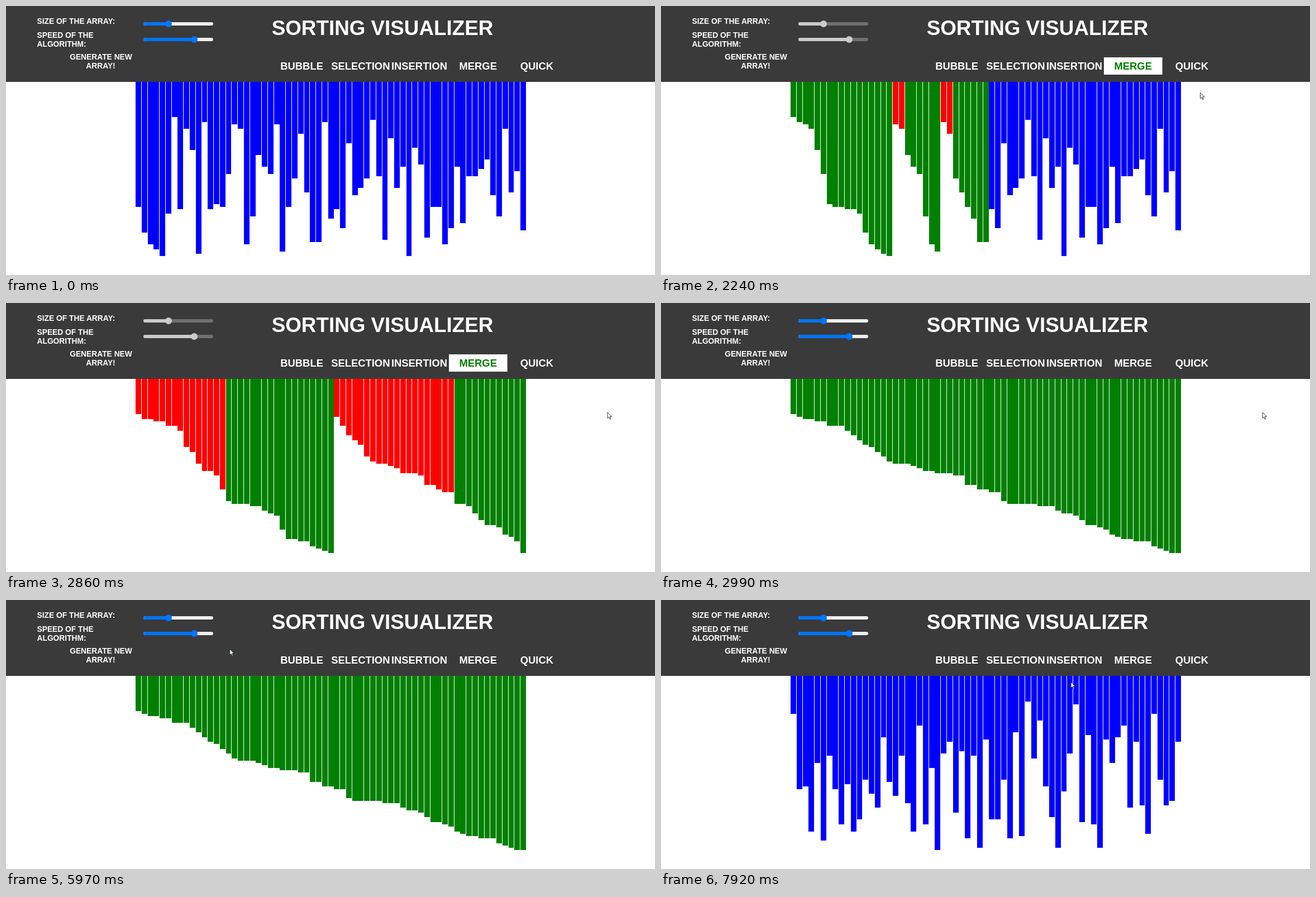
Recreate the animation shown at these times as an HTML page. Size 1162 by 482 pixels, loop 7.99 s.

```html
<!DOCTYPE html>
<html lang="en">
<head>
<meta charset="utf-8">
<title>Sorting visualizer</title>
<style>
  html, body { margin: 0; width: 100%; height: 100%; overflow: hidden; background: #fff; }
  svg { display: block; width: 1162px; height: 482px; }
  text { font: bold 13.8px "Liberation Sans", Arial, sans-serif; fill: #fff; }
  .mid { text-anchor: middle; }
  .title { font-size: 36.8px; }
  .nav text { font-size: 18.4px; }
  .nav rect { fill: none; }
  .nav .lit rect { fill: #fff; }
  .nav .lit text { fill: green; }
  .track { fill: #efefef; }
  .level { fill: #0075ff; }
  .busy .track { fill: #707070; }
  .busy .level { fill: #cbcbcb; }
  #cursor path { fill: #fff; stroke: #12301a; stroke-width: .9; stroke-linejoin: round; }
</style>
</head>
<body>
<svg id="stage" viewBox="0 0 1162 482">
  <rect width="1162" height="136" fill="#3a3a3a"/>
  <text x="55.5" y="31.5">SIZE OF THE ARRAY:</text>
  <text x="55.5" y="56.5">SPEED OF THE</text>
  <text x="55.5" y="72.5">ALGORITHM:</text>
  <text class="mid" x="170" y="96">GENERATE NEW</text>
  <text class="mid" x="169.5" y="112">ARRAY!</text>
  <text class="mid title" x="674" y="52">SORTING VISUALIZER</text>
  <g id="sliders"></g>
  <g id="nav" class="nav"></g>
  <g id="bars" shape-rendering="crispEdges"></g>
  <g id="cursor">
    <path id="arrow" d="M0 0V10.5L2.4 8.3 4.2 12.3 5.8 11.6 4.1 7.7H7.3Z"/>
    <path id="hand" d="M-1.2 1Q0-.6 1.2 1V5.2L6.5 6.3Q7.8 7 7.6 9L6.5 15H.3L-3.6 9.6Q-3.4 7.6-1.2 9Z"/>
  </g>
</svg>
<script>
const LOOP = 7990, BUSY_FROM = 1770, BUSY_TO = 2985, REFILL = 7370, TICK = 68;

const first = [
  53, 64, 69, 71, 74, 56, 15, 54, 20, 29, 73, 17, 54, 52, 53, 39, 18, 20, 69, 57, 31, 36,
  39, 18, 72, 53, 41, 22, 47, 68, 68, 17, 58, 54, 62, 26, 48, 45, 41, 16, 40, 67, 24, 45,
  36, 74, 28, 35, 66, 53, 53, 69, 62, 36, 60, 40, 40, 37, 33, 48, 57, 20, 47, 38, 63];
const second = [
  16, 48, 47, 66, 37, 70, 34, 48, 63, 46, 66, 61, 44, 50, 56, 26, 45, 51, 34, 54, 66, 21,
  63, 39, 74, 33, 28, 58, 32, 69, 34, 73, 27, 61, 61, 44, 69, 24, 68, 11, 35, 19, 47, 60,
  73, 49, 33, 12, 62, 25, 63, 73, 27, 37, 26, 21, 56, 28, 55, 67, 16, 44, 55, 53, 28];

// [time, steps done]
const progress = [[1892, 0], [1972, 60], [2516, 486], [2856, 753], [2980, 849]];

// [time, x, y] of the pointer tip
const route = [
  [0, 1118, 500], [70, 1114, 474], [350, 1000, 330], [600, 880, 170], [740, 845, 112],
  [820, 838, 107], [890, 838, 106], [1990, 838, 106], [2100, 880, 120], [2380, 1050, 190],
  [2520, 1076, 196], [2860, 1077, 196], [3540, 1077, 196], [3800, 960, 212], [4100, 800, 211],
  [4360, 617, 195], [4430, 576, 187], [4800, 400, 90], [5100, 220, 10], [5210, 182, 0],
  [5350, 182, 0], [5550, 137, 60], [5700, 190, 100], [5970, 400, 88], [6160, 540, 100],
  [6300, 620, 110], [6480, 670, 131], [6700, 474, 126], [6970, 246, 57], [7130, 185, 96],
  [7400, 181, 98], [7780, 555, 130], [7920, 734, 147], [7990, 734, 147]];

const $ = id => document.getElementById(id);

function add(parent, tag, attrs, text = "") {
  const el = document.createElementNS("http://www.w3.org/2000/svg", tag);
  for (const key in attrs) el.setAttribute(key, attrs[key]);
  el.textContent = text;
  return parent.appendChild(el);
}

function at(keys, t) {
  if (t <= keys[0][0]) return keys[0].slice(1);
  const i = keys.findIndex(k => k[0] > t);
  if (i < 0) return keys[keys.length - 1].slice(1);
  const a = keys[i - 1], b = keys[i], p = (t - a[0]) / (b[0] - a[0]);
  return a.slice(1).map((v, j) => v + (b[j + 1] - v) * p);
}

// Every colour change of a recursive merge sort: [index, value, colour]
function mergeSteps(source) {
  const a = source.slice(), steps = [];
  const mark = (i, colour) => steps.push([i, a[i], colour]);
  function sort(start, end) {
    if (start >= end) return;
    const mid = (start + end) >> 1;
    mark(mid, "yellow");
    sort(start, mid);
    sort(mid + 1, end);
    const merged = [];
    let p = start, q = mid + 1;
    while (p <= mid || q <= end) {
      const i = q > end || (p <= mid && a[p] < a[q]) ? p++ : q++;
      merged.push(a[i]);
      mark(i, "red");
    }
    merged.forEach((v, k) => { a[start + k] = v; mark(start + k, "green"); });
  }
  sort(0, a.length - 1);
  return steps;
}

for (const [y, x] of [[32, 291], [60, 337]]) {
  const bar = { x: 246, y: y - 3, height: 6, rx: 3 };
  add($("sliders"), "rect", { ...bar, width: 125, class: "track" });
  add($("sliders"), "rect", { ...bar, width: x - 246, class: "level" });
  add($("sliders"), "circle", { cx: x, cy: y, r: 6, class: "level" });
}

const buttons = ["BUBBLE", "SELECTION", "INSERTION", "MERGE", "QUICK"].map((name, i) => {
  const g = add($("nav"), "g", {}), x = 477.4 + 105.2 * i;
  add(g, "rect", { x, y: 92, width: 104.6, height: 31 });
  add(g, "text", { x: x + 52.2, y: 113.6, class: "mid" }, name);
  return { g, x, merge: name === "MERGE" };
});

const bars = first.map((v, i) =>
  add($("bars"), "rect", { x: 232.1 + 10.766 * i, y: 136, width: 9.9 }));
const steps = mergeSteps(first);

function draw(t) {
  const values = (t < REFILL ? first : second).slice();
  const colours = values.map(() => "blue");
  if (t < REFILL) {
    const tick = Math.floor((t + 6) / TICK) * TICK;
    const done = Math.floor(at(progress, tick)[0]);
    for (const [i, v, colour] of steps.slice(0, done)) {
      values[i] = v;
      colours[i] = colour;
    }
  }
  bars.forEach((bar, i) => {
    bar.setAttribute("height", values[i] * 4.22);
    bar.setAttribute("fill", colours[i]);
  });

  const busy = t >= BUSY_FROM && t < BUSY_TO;
  $("sliders").classList.toggle("busy", busy);

  const [x, y] = at(route, t);
  let pointing = x > 113 && x < 227 && y > 84 && y < 116;
  for (const b of buttons) {
    const over = x >= b.x && x < b.x + 104.6 && y >= 92 && y < 123;
    b.g.classList.toggle("lit", busy ? b.merge : over);
    pointing ||= over;
  }
  $("cursor").setAttribute("transform", `translate(${x} ${y})`);
  $("hand").style.display = pointing ? "" : "none";
  $("arrow").style.display = pointing ? "none" : "";
}

const begin = performance.now();
function frame() {
  draw((performance.now() - begin) % LOOP);
  requestAnimationFrame(frame);
}
frame();
</script>
</body>
</html>
```
